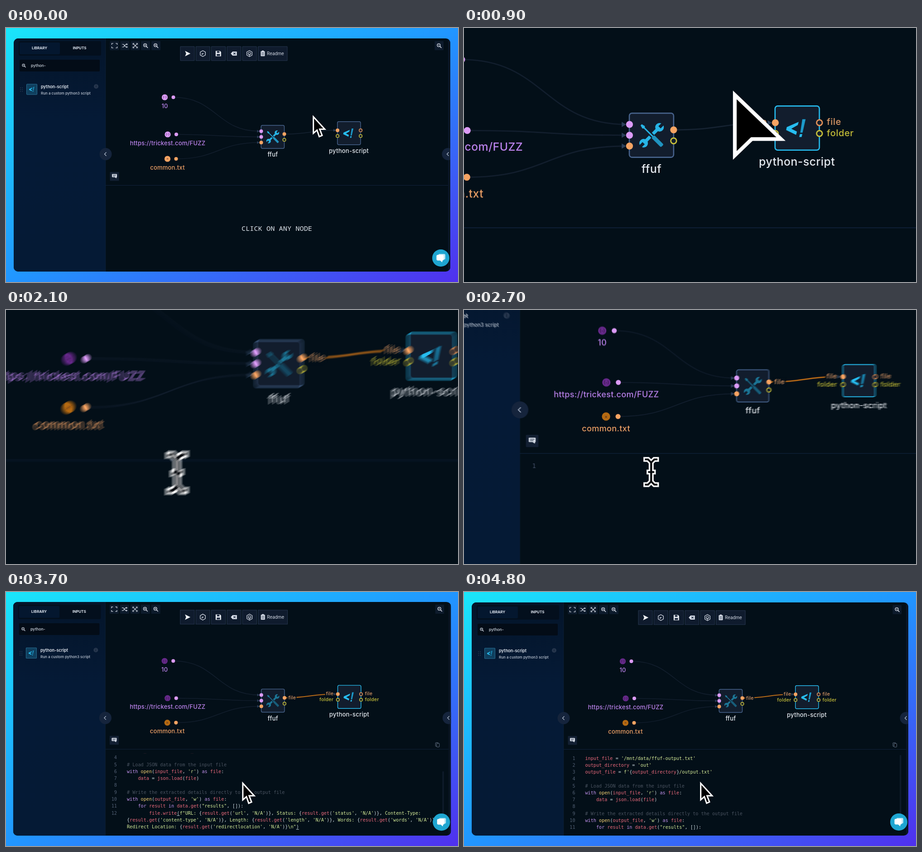
Write an HTML page with a canvas that moves like this. It is 998x561 px and loops after 4.9 s.

```html
<!DOCTYPE html>
<html lang="en">
<head>
<meta charset="utf-8">
<title>Workflow editor</title>
<style>
html, body { margin: 0; width: 100%; height: 100%; overflow: hidden; background: #030f18; }
canvas { display: block; }
</style>
</head>
<body>
<canvas id="stage" width="998" height="561"></canvas>
<script>
const W = 998, H = 561, LOOP = 4900;
const HOVER = 550, CLICK = 1300, IBEAM = 1850, PASTE = 2950;
const out = document.getElementById('stage').getContext('2d');
const buffer = document.createElement('canvas');
buffer.width = W;
buffer.height = H;
const c = buffer.getContext('2d');

const SANS = 'Inter, "Open Sans", sans-serif';
const MONO = '"DejaVu Sans Mono", "Noto Sans Mono", monospace';
const BG = '#030f18', ICON = '#d5dbe6', PURPLE = '#dc9bf7', ORANGE = '#f7a463',
      YELLOW = '#c9c13a', CYAN = '#27bdf0';

const CODE = [
  [1, "input_file = '/mnt/data/ffuf-output.txt'"],
  [2, "output_directory = 'out'"],
  [3, "output_file = f'{output_directory}/output.txt'"],
  [4, ''],
  [5, '# Load JSON data from the input file'],
  [6, "with open(input_file, 'r') as file:"],
  [7, '    data = json.load(file)'],
  [8, ''],
  [9, '# Write the extracted details directly to the output file'],
  [10, "with open(output_file, 'w') as file:"],
  [11, '    for result in data.get("results", []):'],
  [12, "        file.write(f\"URL: {result.get('url', 'N/A')}, Status: {result.get('status', 'N/A')}, Content-Type:"],
  ['', "{result.get('content-type', 'N/A')}, Length: {result.get('length', 'N/A')}, Words: {result.get('words', 'N/A')},"],
  ['', "Redirect Location: {result.get('redirectlocation', 'N/A')}\\n\")"]
];

const SYNTAX = [
  [/^#.*/, '#4a5360'],
  [/^(f?'[^'{]*'|"\w+"|f?['"]|\\n"|\/[\w.]+|[A-Z][\w-]*:?)/, '#d8ee9a'],
  [/^(with|as|for|in)\b/, '#c594f0'],
  [/^open\b/, '#f3cf72'],
  [/^[a-z_]+(\.[a-z]+)?/, '#ec6a7c'],
  [/^./, '#c9d6dc']
];

function tokens(line) {
  const list = [];
  for (let i = 0; i < line.length;) {
    const rest = line.slice(i);
    const [rule, color] = SYNTAX.find(([r]) => r.test(rest));
    const word = rest.match(rule)[0];
    list.push([word, i, color]);
    i += word.length;
  }
  return list;
}
const PARSED = CODE.map(([num, line]) => [num, tokens(line)]);

// motion
const settle = (t, start, rate) => {
  const x = Math.max(0, t - start) / 1000 * rate;
  return 1 - (1 + x) * Math.exp(-x);
};
const smooth = (t, a, b) => {
  const x = Math.min(1, Math.max(0, (t - a) / (b - a)));
  return x * x * (3 - 2 * x);
};

const PAN_X = 319, PAN_Y = -183;
const zoomAt = t => settle(t, 200, 5.75) * (1 - settle(t, 2364, 6.07));
const panAt = t => settle(t, 1800, 7.3);

function camera(t) {
  const zoom = zoomAt(t), pan = panAt(t);
  return { s: 1 + zoom, x: (-781 + PAN_X * pan) * zoom, y: (-244.5 + PAN_Y * pan) * zoom };
}

// camera at t, smeared by dt: slide along the pan, light zoom about a fixed point
function smear(t, dt) {
  const cam = camera(t), fx = 330, fy = 290;
  const k = (1 + zoomAt(t + dt / 2)) / cam.s;
  const slide = (panAt(t + dt) - panAt(t)) * zoomAt(t);
  return {
    s: cam.s * k,
    x: fx + (cam.x - fx) * k + PAN_X * slide,
    y: fy + (cam.y - fy) * k + PAN_Y * slide
  };
}

const PATH = [
  [0, 677, 192], [900, 683, 188.6], [1250, 745, 222], [1450, 745, 222],
  [1980, 476.5, 361], [2250, 476.5, 361], [2650, 428, 377], [2900, 428, 377],
  [3080, 511, 411], [3450, 521, 418.5], [LOOP, 521, 418.5]
];
function pointer(t) {
  const i = Math.max(1, PATH.findIndex(p => p[0] > t));
  const [t0, x0, y0] = PATH[i - 1], [t1, x1, y1] = PATH[i];
  const k = smooth(t, t0, t1);
  return [x0 + (x1 - x0) * k, y0 + (y1 - y0) * k];
}

// drawing helpers
function text(str, x, y, size, color, weight = 500, align = 'left', spacing = 0, family = SANS) {
  c.font = `${weight} ${size}px ${family}`;
  c.textAlign = align;
  c.letterSpacing = spacing + 'px';
  c.fillStyle = color;
  c.fillText(str, x, y + size * 0.35);
}
function box(x, y, w, h, r, fill, line, width = 1) {
  c.beginPath();
  c.roundRect(x, y, w, h, r);
  if (fill) { c.fillStyle = fill; c.fill(); }
  if (line) { c.strokeStyle = line; c.lineWidth = width; c.stroke(); }
}
function dot(x, y, r, fill, line, width = 1.5) {
  c.beginPath();
  c.arc(x, y, r, 0, Math.PI * 2);
  if (fill) { c.fillStyle = fill; c.fill(); }
  if (line) { c.strokeStyle = line; c.lineWidth = width; c.stroke(); }
}
function trace(points, close) {
  c.beginPath();
  for (const [x, y] of points) c.lineTo(x, y);
  if (close) c.closePath();
}
function line(points, color, width = 1, close = false) {
  trace(points, close);
  c.strokeStyle = color;
  c.lineWidth = width;
  c.stroke();
}
function shape(points, color) {
  trace(points, true);
  c.fillStyle = color;
  c.fill();
}
function at(x, y, draw, scale = 1) {
  c.save();
  c.translate(x, y);
  c.scale(scale, scale);
  draw();
  c.restore();
}
const hexagon = r => Array.from({ length: 6 }, (_, i) => {
  const a = Math.PI * (i / 3 + 1 / 6);
  return [Math.cos(a) * r, Math.sin(a) * r];
});

// icons
const lens = () => {
  dot(-1, -1, 3.4, null, ICON, 1.3);
  line([[1.6, 1.6], [5, 5]], ICON, 1.6);
  dot(-1, -1, 1.1, ICON);
};
const chevron = () => line([[2, -4], [-2, 0], [2, 4]], '#b9c5d6', 1.2);
const bubble = () => {
  box(-5.5, -4.5, 11, 7, 1, ICON);
  shape([[0, 2], [5, 2], [4, 5]], ICON);
  line([[-3.5, -2], [3.5, -2]], '#18263a', 0.9);
  line([[-3.5, 0.3], [2, 0.3]], '#18263a', 0.9);
};
const corners = () => {
  for (const [i, j] of [[1, 1], [1, -1], [-1, 1], [-1, -1]])
    line([[i * 2.5, j * 5], [i * 6, j * 5], [i * 6, j * 2]], ICON, 1.2);
};
const shuffle = () => {
  for (const k of [1, -1]) {
    line([[-6, 3 * k], [-3, 3 * k], [2, -3 * k], [5, -3 * k]], ICON, 1.2);
    shape([[3.5, -3 * k - 2.3], [6.5, -3 * k], [3.5, -3 * k + 2.3]], ICON);
  }
};
const expand = () => {
  line([[-4, -4], [4, 4]], ICON, 1.1);
  line([[-4, 4], [4, -4]], ICON, 1.1);
  for (const [i, j] of [[1, 1], [1, -1], [-1, 1], [-1, -1]])
    line([[i * 2, j * 5], [i * 5, j * 5], [i * 5, j * 2]], ICON, 1.1);
};
const play = () => shape([[-5, -6], [7, 0], [-5, 6], [-2.5, 0]], '#f0f3f7');
const hexDot = () => {
  line(hexagon(6.6), ICON, 1.3, true);
  line([[-1.5, 3], [-1.5, 0], [1.8, 0]], ICON, 1.4);
};
const disk = () => {
  shape([[-6, -6], [3.5, -6], [6, -3.5], [6, 6], [-6, 6]], '#e6eaf0');
  box(-3.2, -5.2, 5.6, 3.4, 0, '#16233a');
  box(-3.6, 1, 7.2, 4, 0, '#16233a');
};
const erase = () => {
  shape([[-7, 0], [-3, -4.5], [6.5, -4.5], [6.5, 4.5], [-3, 4.5]], ICON);
  line([[-1, -2], [3.5, 2]], '#16233a', 1.2);
  line([[-1, 2], [3.5, -2]], '#16233a', 1.2);
};
const cube = () => {
  line(hexagon(6.8), ICON, 1.2, true);
  dot(0, 0, 3, null, ICON, 1.2);
  line([[0, 0], [0, 6]], ICON, 1);
};
const page = () => {
  box(-4.5, -5, 9, 11, 1, ICON);
  box(-2, -6.5, 4, 2.5, 0.5, ICON);
  for (const y of [-2, 0.5, 3]) line([[-2.8, y], [2.8, y]], '#16233a', 0.8);
};
const script = () => {
  shape([[2, -7.5], [1, -3.8], [-6.5, 0.5], [0, 3.8], [-1, 7.6], [-12.5, 2], [-11.8, -1.4]], CYAN);
  shape([[6.2, -10.5], [10, -10.5], [6.5, 5], [3.8, 5]], '#1c9bcb');
  shape([[3.4, 6.6], [6.2, 6.6], [5.4, 10], [2.6, 10]], CYAN);
};
const tools = dim => () => {
  const a = dim ? '#1c7595' : '#27b4e6', b = dim ? '#175c79' : '#2093c0';
  c.save();
  c.rotate(-Math.PI / 4);
  box(-11, -1.9, 22, 3.8, 0, a);
  for (const k of [1, -1]) {
    dot(k * 13, 0, 5, a);
    box(k > 0 ? 13 : -18.5, -1.8, 5.5, 3.6, 0, '#121d2d');
  }
  c.restore();
  c.save();
  c.rotate(Math.PI / 4);
  box(-14, -2.3, 32, 4.6, 1, '#121d2d');
  box(-13, -0.8, 16, 1.6, 0, a);
  shape([[-17, -1], [-13, -2], [-11, 0], [-13, 2], [-17, 1]], a);
  box(2, -2.3, 15.5, 4.6, 1.5, b);
  c.restore();
};

function backdrop() {
  const g = c.createLinearGradient(0, 0, 479, 853);
  g.addColorStop(0, '#1ae6fa');
  g.addColorStop(0.5, '#2196ff');
  g.addColorStop(1, '#5030ee');
  c.fillStyle = g;
  c.fillRect(0, 0, W, H);
}

function sidebar() {
  const g = c.createLinearGradient(0, 23, 0, 538);
  g.addColorStop(0, '#04152a');
  g.addColorStop(0.35, '#051a36');
  g.addColorStop(1, '#051a35');
  c.fillStyle = g;
  c.fillRect(17, 23, 203, 515);
  line([[219.8, 23], [219.8, 538]], '#10233a', 0.8);
  box(28, 29, 182, 32, 3, '#030f1d');
  box(30, 32, 89, 26, 2, '#06204380');
  text('LIBRARY', 74, 44.5, 8, '#dfe6f0', 700, 'center');
  text('INPUTS', 162.5, 44.5, 8, '#dfe6f0', 700, 'center');
  box(30, 70, 177, 26, 2, '#030c17');
  at(39.5, 83, lens, 0.8);
  text('python-', 55, 83, 8.6, '#d3dae4');
  for (let i = 0; i < 6; i++) dot(32.2 + i % 2 * 4, 132 + (i >> 1) * 4, 0.8, '#3c4d66');
  box(45.5, 124, 23, 23, 1, '#0f3f5e', '#2a6f94');
  at(57.3, 135.5, script, 0.52);
  text('python-script', 77, 129.5, 9.2, '#e4e9f1', 600);
  text('Run a custom python3 script', 77, 144, 8, '#c3ccd9');
  dot(199, 129, 5, '#26364d');
  text('i', 199, 129, 7, '#0b1a30', 600, 'center');
}

function toolbars() {
  [corners, shuffle, expand, lens, lens].forEach((icon, i) => {
    const x = 239.5 + i * 22.9;
    box(x - 10, 29, 20, 20, 1, '#0d1b2c');
    at(x, 39, icon);
    if (i > 2) line([[x - 2.8, 38], [x + 0.8, 38]], ICON, 1);
  });
  [play, hexDot, disk, erase, cube].forEach((icon, i) => {
    const x = 400.3 + i * 34.3;
    box(x - 15.3, 41, 31, 31, 0, '#0f1b2d', '#26374f');
    at(x, 56.5, icon);
  });
  box(556.5, 41, 64.5, 31, 0, '#0f1b2d', '#26374f');
  at(567, 56.3, page);
  text('Readme', 576, 56.3, 9.8, '#d5dbe6', 400);
  box(946.5, 29, 19.5, 20, 1, '#0d1b2c');
  at(956.5, 39, lens);
  box(229.5, 318, 20, 19.5, 1, '#132033');
  at(239.5, 327, bubble);
}

function edge(x0, y0, x1, y1, color, width) {
  const m = (x0 + x1) / 2;
  c.beginPath();
  c.moveTo(x0, y0);
  c.bezierCurveTo(m, y0, m, y1, x1, y1);
  c.strokeStyle = color;
  c.lineWidth = width;
  c.stroke();
}
const arrowhead = (x, y) => shape([[x - 5, y - 3], [x, y], [x - 5, y + 3]], '#2c405a');

function input(x, y, label, labelY, color, ink, fill, mark) {
  dot(x, y, 6.6, fill);
  text(mark, x, y, 7, '#2a1733a0', 600, 'center');
  dot(x + 19, y, 4, color);
  text(label, x, labelY, 13, ink, 500, 'center', 0.22);
}
function tag(str, x, y, color, align = 'left') {
  text(str, x, y, 10.5, color, 500, align, 0.3);
}

function graph(t) {
  const hover = t >= HOVER, active = t >= CLICK;
  edge(370, 153, 560, 228, '#121e2d', 1.5);
  edge(376, 235, 560, 240.5, '#121e2d', 1.5);
  edge(376, 289, 560, 253, '#121e2d', 1.5);
  edge(614, 234.3, 728, 226, active ? '#b96a17' : '#162332', active ? 2 : 1.5);
  if (active) box(621, 227, 20, 14, 0, BG);
  if (hover) box(704, 219, 24, 13, 0, BG);
  for (const y of [228, 240.5, 253]) arrowhead(559.5, y);
  arrowhead(728, 226);

  const purple = active ? '#66298a' : PURPLE;
  input(350.5, 153, '10', 172, PURPLE, '#bd84ee', purple, '(-)');
  input(357, 235, 'https://trickest.com/FUZZ', 254, PURPLE, '#bd84ee', purple, '(-)');
  input(356.5, 289, 'common.txt', 308, ORANGE, '#eda066', active ? '#b56a12' : ORANGE, '×');

  box(563.3, 215, 51.2, 51, 3, '#121d2d', '#47638c', 1.4);
  at(589, 240.5, tools(active));
  dot(563.5, 228, 4, PURPLE);
  dot(563.5, 240.5, 4, PURPLE);
  dot(563.5, 253, 4, ORANGE);
  dot(614.5, 234.3, 4, ORANGE);
  dot(614.5, 247, 3.3, '#121d2d', YELLOW);
  text('ffuf', 589, 279.5, 13, '#e8ecf2', 500, 'center', 0.25);

  box(731.7, 206.7, 51.2, 51, 3, '#121d2d', hover ? CYAN : '#47638c', 1.4);
  at(757, 232.5, script);
  dot(732, 226, 4, ORANGE);
  dot(732, 238.5, 3.3, '#121d2d', YELLOW);
  dot(783, 226, 3.3, '#121d2d', '#e8955a');
  dot(783, 238.5, 3.3, '#121d2d', YELLOW);
  text('python-script', 757, 271.3, 13, '#e8ecf2', 500, 'center', 0.25);
  if (hover) {
    tag('file', 722.5, 225, '#dd9a68', 'right');
    tag('folder', 722.5, 238, YELLOW, 'right');
    tag('file', 791.5, 225, '#dd9a68');
    tag('folder', 791.5, 238, YELLOW);
  }
  if (active) tag('file', 623, 234, '#dd9a68');
}

function editor(t) {
  line([[220, 347.5], [976, 347.5]], '#11223a', 1);
  if (t < CLICK) {
    text('CLICK ON ANY NODE', 598, 442.5, 15.3, '#dfe5ec', 400, 'center', 0, '"Noto Sans Mono", monospace');
    return;
  }
  box(947, 333, 6, 8, 1, null, '#6d7b8e', 0.9);
  box(949.5, 334.5, 6, 8, 1, BG, '#6d7b8e', 0.9);
  if (t < PASTE) {
    text('1', 245.5, 367, 10.15, '#46536a', 400, 'right', 0, MONO);
    return;
  }
  const scroll = 47 * (1 - smooth(t, 3850, 4450)), step = 6.11;
  c.save();
  c.beginPath();
  c.rect(220, 357, 756, 172);
  c.clip();
  PARSED.forEach(([num, words], row) => {
    const y = 367 + row * 15.27 - scroll;
    text(num, 245.5, y, 10.15, '#526074', 400, 'right', 0, MONO);
    for (const [word, col, color] of words)
      text(word, 267.5 + col * step, y, 10.15, color, 400, 'left', 0, MONO);
  });
  const y = 367 - scroll + 5.5;
  line([[267.5 + 18 * step, y + 11 * 15.27], [267.5 + 19 * step, y + 11 * 15.27]], '#c9d6dc', 1);
  line([[267.5 + 61 * step, y + 13 * 15.27], [267.5 + 62 * step, y + 13 * 15.27]], '#c9d6dc', 1);
  if (t < 3500) line([[268 + 62 * step, y - 11 + 13 * 15.27], [268 + 62 * step, y + 13 * 15.27]], '#c05068', 0.9);
  c.restore();
  box(962, 360 + scroll * 0.77, 3.5, 130, 1.5, t < 3500 ? '#1c2b40' : '#0e1b2a');
}

function sideTabs() {
  dot(220, 278.5, 13.5, '#15243c');
  at(219.5, 278.5, chevron);
  c.fillStyle = '#0a1626';
  c.fillRect(976, 23, 5, 515);
  dot(976, 278.5, 13.5, '#15243c');
  at(975.5, 278.5, chevron);
}

function chat() {
  dot(960, 508, 19, '#1fa6d1');
  box(954.5, 499, 15.5, 12.5, 3, '#bfe6f3');
  box(950.5, 501, 16, 12.5, 3, '#ffffff');
  shape([[958, 513], [964, 513], [963, 517.5]], '#ffffff');
}

const ARROW = [[1.7, 4], [1.7, 40.5], [9.7, 33.5], [14.7, 48], [21, 45.3], [15.7, 31.5], [26.8, 31.5]];
const WIDE_ARROW = [[2.2, 5.3], [2.2, 75.2], [21.8, 56.3], [55.5, 56.3]];
const BEAM = [[[-8.5, -20], [-5, -20], [0, -15], [0, 15], [5, 20], [8.5, 20]],
              [[8.5, -20], [5, -20], [0, -15], [0, 15], [-5, 20], [-8.5, 20]],
              [[-3.5, 0], [3.5, 0]]];

function cursor(t, pos) {
  at(...pos, () => {
    c.lineJoin = 'miter';
    if (t >= IBEAM && t < PASTE) {
      c.lineCap = 'square';
      for (const p of BEAM) line(p, '#ffffff', 7.6);
      for (const p of BEAM) line(p, '#05080c', 2.8);
      return;
    }
    const wide = t >= HOVER && t < CLICK;
    const points = wide ? WIDE_ARROW : ARROW;
    shape(points, '#000000');
    line(points, '#ffffff', wide ? 4.3 : 3, true);
  });
}

function scene(t, cam) {
  c.setTransform(cam.s, 0, 0, cam.s, cam.x, cam.y);
  backdrop();
  c.save();
  c.beginPath();
  c.roundRect(17, 23, 964, 515, 10);
  c.clip();
  c.fillStyle = BG;
  c.fillRect(17, 23, 964, 515);
  sidebar();
  toolbars();
  graph(t);
  editor(t);
  sideTabs();
  chat();
  c.restore();
  cursor(t, pointer(t));
}

// averages a few views while the camera moves fast
function render(t) {
  const shutter = 18, a = smear(t, -shutter / 2), b = smear(t, shutter / 2);
  const shift = Math.hypot((b.s - a.s) * 499 + b.x - a.x, (b.s - a.s) * 280 + b.y - a.y);
  const n = shift > 1 || Math.abs(b.s - a.s) > 0.003 ? 7 : 1;
  for (let i = 0; i < n; i++) {
    scene(t, smear(t, n > 1 ? (i / (n - 1) - 0.5) * shutter : 0));
    out.globalAlpha = 1 / (i + 1);
    out.drawImage(buffer, 0, 0);
  }
}

const start = performance.now();
function tick() {
  render((performance.now() - start) % LOOP);
  requestAnimationFrame(tick);
}
tick();
</script>
</body>
</html>
```
